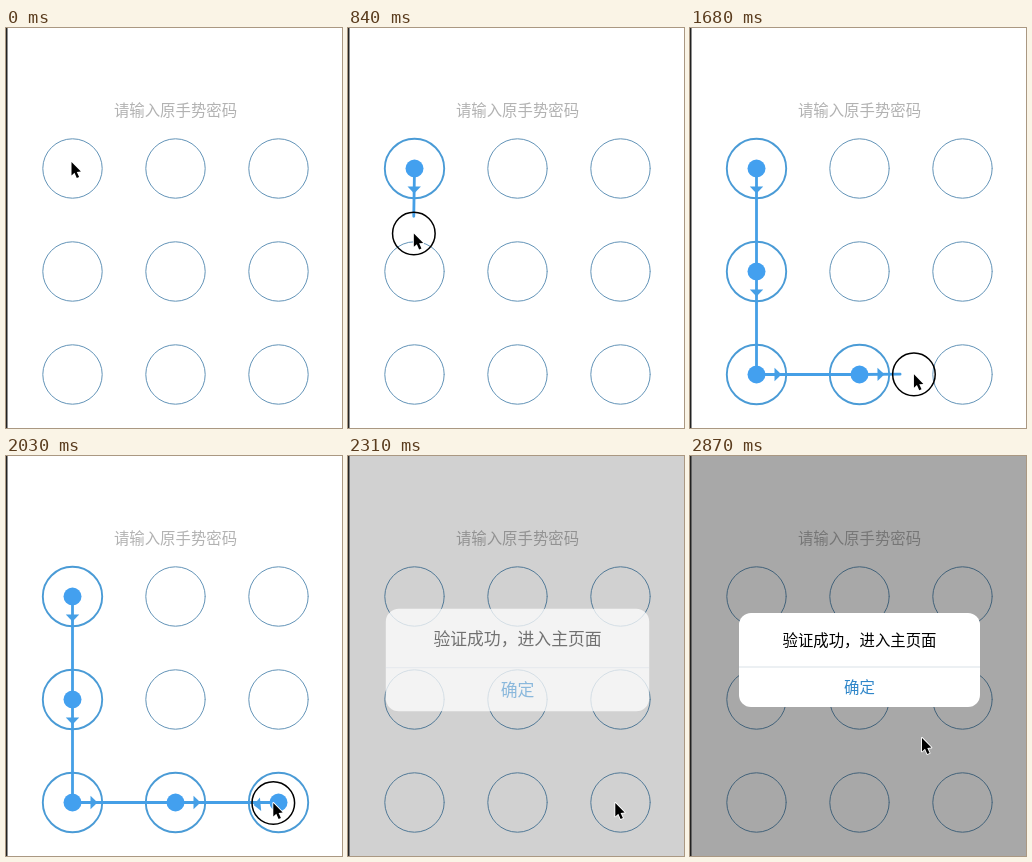
An HTML page with a canvas that plays this animation: 336 px wide and 400 px high, repeating every 3010 ms.

```html
<!DOCTYPE html>
<html lang="zh-CN">
<head>
<meta charset="utf-8">
<style>
html, body { margin: 0; width: 100%; height: 100%; overflow: hidden; background: #fff; }
canvas { display: block; width: 336px; height: 400px; }
</style>
</head>
<body>
<canvas id="stage"></canvas>
<script>
const W = 336, H = 400, LOOP = 3010, STEP = 70;
const PRESS = 540, RELEASE = 2150, ALERT = 2230, LAG = 33;
const FONT = '"Noto Sans CJK SC", "Noto Sans CJK", sans-serif';
const BLUE = '#459fe6', DOT = '#43a0ef';

const canvas = document.getElementById('stage');
const ctx = canvas.getContext('2d');
const dpr = window.devicePixelRatio || 1;
canvas.width = W * dpr;
canvas.height = H * dpr;

const nodes = [];
for (let i = 0; i < 9; i++) nodes.push({ x: 66.5 + 103 * (i % 3), y: 140.5 + 103 * Math.floor(i / 3) });

// Pointer moves: start, end, target
const START = { x: 65.5, y: 134 };
const MOVES = [
  [610, 1190, 66.5, 344],
  [1230, 1880, 267.3, 347],
  [2390, 2700, 232, 282]
];

const ease = p => (1 - Math.cos(Math.PI * Math.min(1, Math.max(0, p)))) / 2;

function pointerAt(t) {
  let { x, y } = START;
  for (const [a, b, tx, ty] of MOVES) {
    const p = ease((t - a) / (b - a));
    x += (tx - x) * p;
    y += (ty - y) * p;
  }
  return { x, y };
}

function selectedAt(t) {
  const picked = [];
  for (let s = PRESS; s <= t; s += 10) {
    const f = pointerAt(s - LAG);
    const hit = nodes.find(n => Math.hypot(n.x - f.x, n.y - f.y) < 30);
    if (hit && !picked.includes(hit)) picked.push(hit);
  }
  return picked;
}

function circle(x, y, r, color, width) {
  ctx.beginPath();
  ctx.arc(x, y, r, 0, Math.PI * 2);
  if (width) {
    ctx.strokeStyle = color;
    ctx.lineWidth = width;
    ctx.stroke();
  } else {
    ctx.fillStyle = color;
    ctx.fill();
  }
}

function label(str, x, y, color, weight) {
  ctx.font = `${weight} 15.4px ${FONT}`;
  ctx.textAlign = 'center';
  ctx.textBaseline = 'alphabetic';
  ctx.fillStyle = color;
  ctx.fillText(str, x, y);
}

function polygon(points) {
  ctx.beginPath();
  points.forEach(([x, y]) => ctx.lineTo(x, y));
  ctx.closePath();
}

function arrow(from, to) {
  if (Math.hypot(to.x - from.x, to.y - from.y) < 1) return;
  ctx.save();
  ctx.translate(from.x, from.y);
  ctx.rotate(Math.atan2(to.y - from.y, to.x - from.x));
  polygon([[18, -6.7], [25, 0], [18, 6.7]]);
  ctx.fillStyle = BLUE;
  ctx.fill();
  ctx.restore();
}

function drawLock(t) {
  const active = t >= PRESS && t < RELEASE;
  const picked = active ? selectedAt(t) : [];
  for (const n of nodes) {
    const on = picked.includes(n);
    circle(n.x, n.y, 29.7, on ? '#4a9bd6' : '#6394b8', on ? 1.9 : 1);
  }
  if (!active) return;

  const path = [...picked, pointerAt(t - LAG)];
  ctx.beginPath();
  path.forEach(p => ctx.lineTo(p.x, p.y));
  ctx.strokeStyle = BLUE;
  ctx.lineWidth = 2.8;
  ctx.lineJoin = ctx.lineCap = 'round';
  ctx.stroke();
  picked.forEach((n, i) => {
    circle(n.x, n.y, 9, DOT);
    arrow(n, path[i + 1]);
  });
}

function drawAlert(t) {
  if (t < ALERT) return;
  const u = (t - ALERT) * 0.0224;
  const p = 1 - Math.exp(-u) * (1 + u);
  ctx.fillStyle = `rgba(0,0,0,${0.34 * p})`;
  ctx.fillRect(0, 0, W, H);

  ctx.save();
  ctx.translate(169.5, 204);
  ctx.scale(1.2 - 0.2 * p, 1.2 - 0.2 * p);
  ctx.globalAlpha = Math.min(1, p * 1.4);
  ctx.beginPath();
  ctx.roundRect(-120.5, -47, 241, 94, 12);
  ctx.fillStyle = '#fff';
  ctx.fill();
  ctx.globalAlpha = p;
  ctx.fillStyle = '#d9e1e8';
  ctx.fillRect(-120.5, 6.5, 241, 1);
  label('验证成功，进入主页面', 0, -14, '#000', 500);
  label('确定', 0, 33, '#2f86c9', 400);
  ctx.restore();
}

function drawPointer(t) {
  const { x, y } = pointerAt(t);
  if (t >= PRESS && t < RELEASE) circle(x, y, 21.3, '#000', 1.5);
  ctx.save();
  ctx.translate(x, y);
  polygon([[0, 0], [0, 13.4], [3, 10.7], [5.3, 16], [7.6, 15], [5.3, 9.9], [9.4, 9.6]]);
  ctx.lineJoin = 'round';
  ctx.lineWidth = 1.8;
  ctx.strokeStyle = '#fff';
  ctx.stroke();
  ctx.fillStyle = '#000';
  ctx.fill();
  ctx.restore();
}

function draw(t) {
  ctx.setTransform(dpr, 0, 0, dpr, 0, 0);
  ctx.fillStyle = '#fff';
  ctx.fillRect(0, 0, W, H);
  label('请输入原手势密码', 169.5, 88, '#b2b2b2', 300);
  drawLock(t);
  drawAlert(t);
  ctx.fillStyle = '#222';
  ctx.fillRect(0, 0, 1.5, H);
  drawPointer(t);
}

const origin = performance.now();
function tick() {
  const t = (performance.now() - origin) % LOOP;
  draw(Math.min(2870, Math.floor(t / STEP) * STEP));
  requestAnimationFrame(tick);
}
tick();
</script>
</body>
</html>
```
